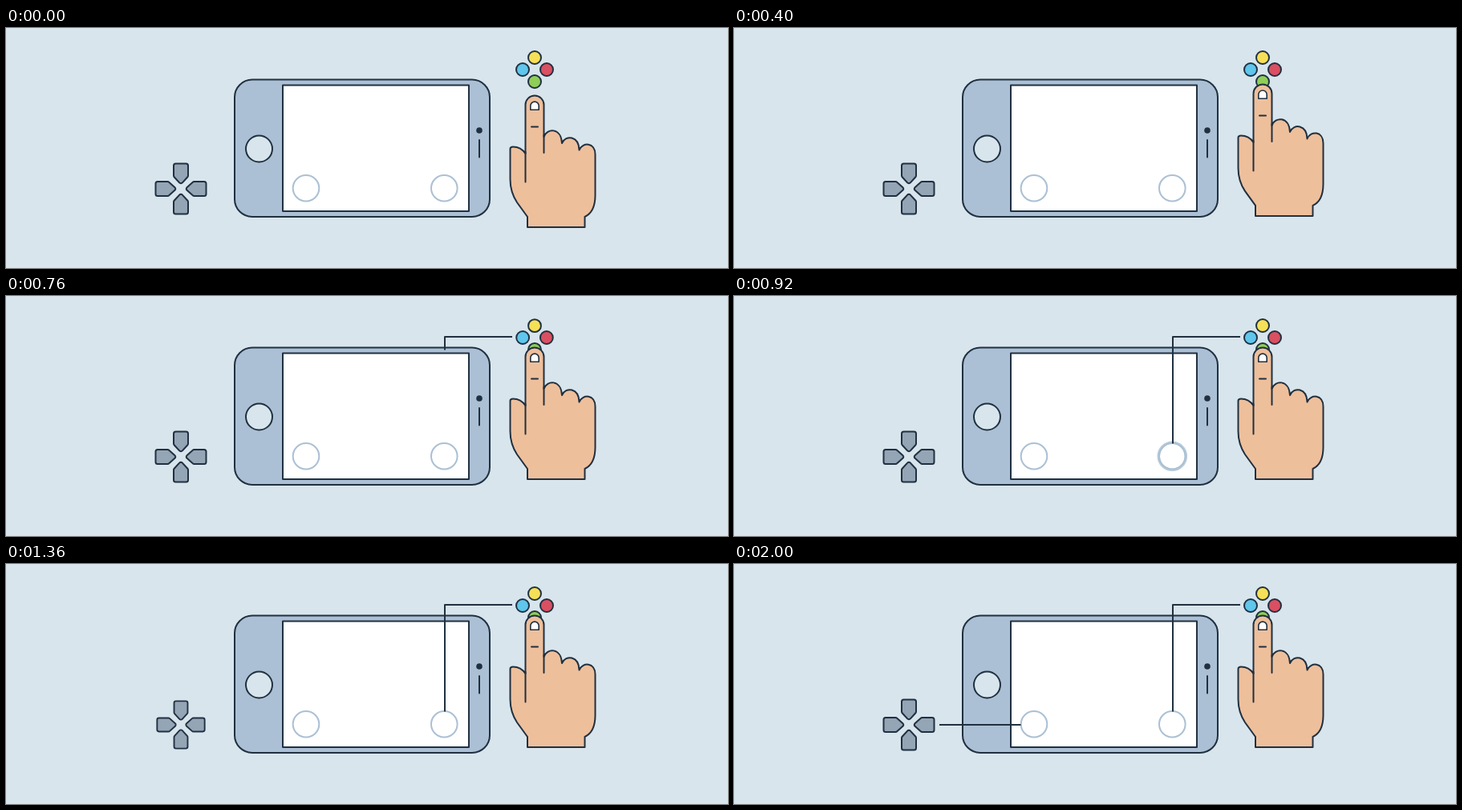
Write an HTML page with a canvas that moves like this. It is 900x300 px and loops after 2400 ms.

```html
<!DOCTYPE html>
<html lang="en">
<head>
<meta charset="utf-8">
<title>Touch controls</title>
<style>
html, body { margin: 0; width: 100%; height: 100%; overflow: hidden; background: #d8e5ec; }
canvas { display: block; width: 900px; height: 300px; }
</style>
</head>
<body>
<canvas id="stage" width="900" height="300"></canvas>
<script>
const ctx = document.getElementById('stage').getContext('2d');
const LOOP = 2400, TICK = 40;
const BG = '#d8e5ec', INK = '#203040', BODY = '#abc0d4', SKIN = '#eebf9b', PAD = '#94a5b5';

const part = (t, from, to) => Math.min(1, Math.max(0, (t - from) / (to - from)));

function paint(fill, stroke = INK, width = 2) {
  if (fill) { ctx.fillStyle = fill; ctx.fill(); }
  if (stroke) { ctx.strokeStyle = stroke; ctx.lineWidth = width; ctx.stroke(); }
}

function disc(x, y, r, fill, stroke, width) {
  ctx.beginPath();
  ctx.arc(x, y, r, 0, Math.PI * 2);
  paint(fill, stroke, width);
}

function line(...pts) {
  ctx.beginPath();
  for (let i = 0; i < pts.length; i += 2) ctx.lineTo(pts[i], pts[i + 1]);
  paint(null);
}

// Draws the first share p of a polyline
function wire(pts, p) {
  if (p <= 0) return;
  const lens = pts.slice(1).map((q, i) => Math.hypot(q[0] - pts[i][0], q[1] - pts[i][1]));
  let left = p * lens.reduce((a, b) => a + b);
  const out = [...pts[0]];
  lens.forEach((len, i) => {
    if (left <= 0) return;
    const k = Math.min(1, left / len), [x, y] = pts[i], [u, v] = pts[i + 1];
    out.push(x + (u - x) * k, y + (v - y) * k);
    left -= len;
  });
  line(...out);
}

function pressed(x, y, p, draw) {
  const s = 1 - 0.06 * Math.sin(Math.PI * p);
  ctx.save();
  ctx.translate(x, y);
  ctx.scale(s, s);
  draw();
  ctx.restore();
}

function phone() {
  ctx.beginPath();
  ctx.roundRect(285, 64.5, 318, 171.5, 22);
  paint(BODY);
  ctx.beginPath();
  ctx.rect(345, 71.5, 232, 157.5);
  paint('#fff');
  disc(315.5, 151, 16.5, BG);
  disc(590, 128, 3.8, INK, null);
  line(590, 140, 590, 161.5);
}

function spot(x, y, p) {
  if (p > 0 && p < 1) {
    ctx.globalAlpha = 1 - p;
    disc(x, y, 16.5 + 7.5 * p, null, '#b4cad8', 3.5);
    ctx.globalAlpha = 1;
  }
  disc(x, y, 16.3, null, BODY);
}

function dpad() {
  for (let i = 0; i < 4; i++) {
    ctx.beginPath();
    ctx.moveTo(0, -31.5);
    ctx.arcTo(9, -31.5, 9, -16, 2.5);
    ctx.arcTo(9, -15.5, 0, -5.5, 2.5);
    ctx.arcTo(0, -5.5, -9, -15.5, 2.5);
    ctx.arcTo(-9, -15.5, -9, -31.5, 2.5);
    ctx.arcTo(-9, -31.5, 0, -31.5, 2.5);
    ctx.closePath();
    paint(PAD);
    ctx.rotate(Math.PI / 2);
  }
}

function buttons() {
  disc(0, -15, 8, '#f6e057');
  disc(-15, 0, 8, '#60c6ec');
  disc(15, 0, 8, '#db4f62');
  disc(0, 15, 8, '#8fce58');
}

function hand(dy) {
  ctx.save();
  ctx.translate(0, dy);
  ctx.beginPath();
  ctx.moveTo(650, 249);
  ctx.lineTo(650, 236);
  ctx.lineTo(637, 218);
  ctx.quadraticCurveTo(628.5, 205, 628.5, 189);
  ctx.lineTo(628.5, 151);
  ctx.quadraticCurveTo(628.5, 148.5, 632, 148.5);
  ctx.quadraticCurveTo(642, 148.5, 647.5, 157);
  ctx.lineTo(647.5, 96);
  ctx.arc(659, 96, 11.5, Math.PI, 0);
  ctx.lineTo(670.5, 136);
  ctx.bezierCurveTo(674, 125, 692, 124, 693, 144);
  ctx.bezierCurveTo(698, 133, 714, 135, 714.5, 152.5);
  ctx.bezierCurveTo(719, 142, 734.5, 143, 734.5, 158);
  ctx.lineTo(734.5, 209);
  ctx.bezierCurveTo(734.5, 222, 730, 232, 721.5, 236);
  ctx.lineTo(721.5, 249);
  ctx.closePath();
  paint(SKIN);
  line(647.5, 155, 647.5, 192.5);
  line(670.5, 134, 670.5, 156);
  line(655, 123.5, 663, 123.5);
  ctx.beginPath();
  ctx.moveTo(653.8, 102.3);
  ctx.lineTo(653.8, 97.3);
  ctx.arc(659, 97.3, 5.2, Math.PI, 0);
  ctx.lineTo(664.2, 102.3);
  ctx.closePath();
  paint('#fff', INK, 1.6);
  ctx.restore();
}

function draw(t) {
  ctx.fillStyle = BG;
  ctx.fillRect(0, 0, 900, 300);
  ctx.lineCap = 'round';
  ctx.lineJoin = 'round';
  phone();
  spot(374, 200.3, part(t, 1620, 1990));
  spot(546.3, 200.3, part(t, 895, 1240));
  ctx.lineCap = 'butt';
  wire([[631, 51], [547, 51], [547, 184.5]], part(t, 640, 900));
  wire([[256, 201], [357.5, 201]], part(t, 1370, 1630));
  ctx.lineCap = 'round';
  pressed(218, 201, part(t, 1270, 1480), dpad);
  pressed(659, 52, part(t, 560, 770), buttons);
  hand(-20 * part(t, 0, 568));
}

const start = performance.now();
function loop(now) {
  const t = Math.max(0, now - start) % LOOP;
  draw(Math.floor(t / TICK) * TICK);
  requestAnimationFrame(loop);
}
draw(0);
requestAnimationFrame(loop);
</script>
</body>
</html>
```
